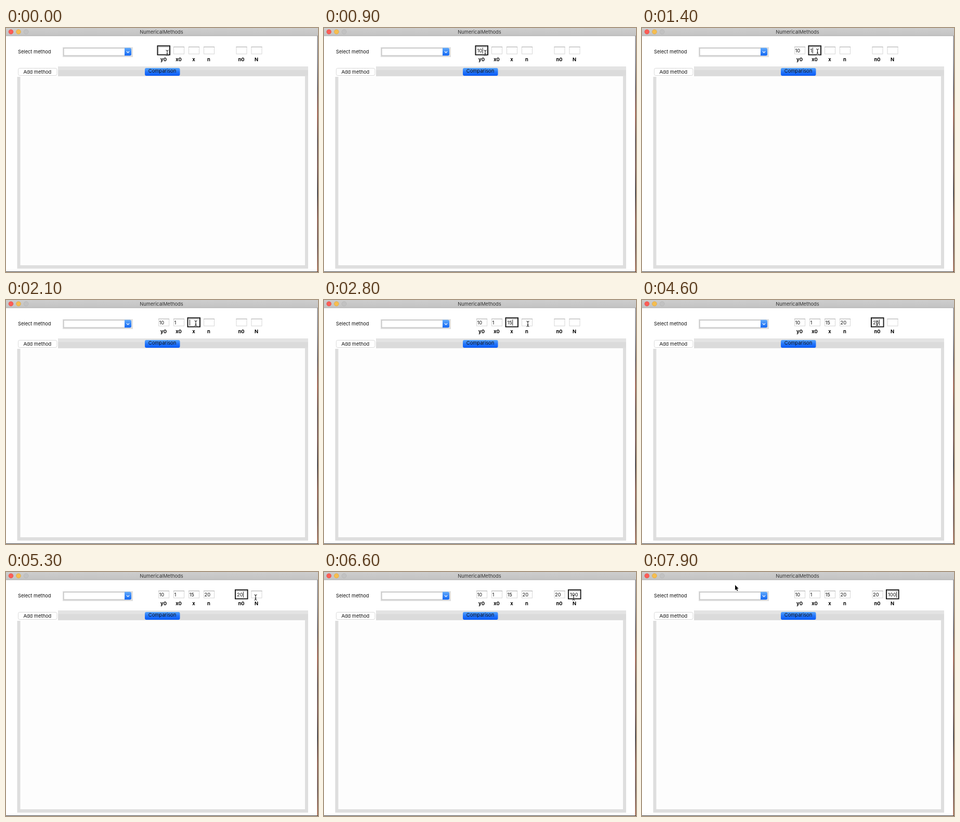
An HTML page with a canvas for the animation above (8 s loop, 600x470 px).

```html
<!DOCTYPE html>
<html lang="en">
<head>
<meta charset="utf-8">
<title>NumericalMethods</title>
<style>
html, body { margin: 0; width: 100%; height: 100%; overflow: hidden; background: #fff; }
canvas { display: block; }
</style>
</head>
<body>
<canvas id="stage" width="600" height="470"></canvas>
<script>
const ctx = document.getElementById('stage').getContext('2d');
const LOOP = 8000, STEP = 100;
const FONT = 'Inter, "Open Sans", sans-serif';

// Entry fields: left edge, label, focus time, [time, text] for each key press
const fields = [
  { x: 293, label: 'y0', focus: 0, keys: [[100, '1'], [500, '10']] },
  { x: 322, label: 'x0', focus: 1200, keys: [[1400, '1']] },
  { x: 351, label: 'x', focus: 2100, keys: [[2300, '1'], [2500, '15']] },
  { x: 380, label: 'n', focus: 3100, keys: [[3300, '2'], [3500, '20']] },
  { x: 442.5, label: 'n0', focus: 4100, keys: [[4400, '2'], [4600, '20']] },
  { x: 471.5, label: 'N', focus: 5600, keys: [[5900, '1'], [6300, '10'], [6400, '100']] }
];

// Pointer stops: time, x, y
const path = [
  [0, 310, 48], [900, 310, 48], [1200, 337.5, 45.5], [1800, 337.5, 45.5],
  [2100, 365, 45], [2600, 365, 45], [2800, 392, 46], [3500, 392, 46],
  [3800, 405, 45], [4100, 452, 45], [4900, 452, 45], [5300, 480, 49],
  [6600, 480, 49], [7700, 183, 23], [7800, 182, 22], [7900, 179, 25]
];

function rect(x, y, w, h, color) {
  ctx.fillStyle = color;
  ctx.fillRect(x, y, w, h);
}

function text(s, x, y, align = 'left', weight = 400, color = '#111') {
  ctx.font = `${weight} 9.3px ${FONT}`;
  ctx.textAlign = align;
  ctx.fillStyle = color;
  ctx.fillText(s, x, y);
}

function vertical(y0, y1, ...colors) {
  const g = ctx.createLinearGradient(0, y0, 0, y1);
  colors.forEach((c, i) => g.addColorStop(i / (colors.length - 1), c));
  return g;
}

function rounded(x, y, w, h, r, fill, stroke) {
  ctx.beginPath();
  ctx.roundRect(x, y, w, h, r);
  ctx.fillStyle = fill;
  ctx.fill();
  if (stroke) {
    ctx.strokeStyle = stroke;
    ctx.lineWidth = 1;
    ctx.stroke();
  }
}

function dot(x, fill, edge) {
  ctx.beginPath();
  ctx.arc(x, 7.3, 4.4, 0, Math.PI * 2);
  ctx.fillStyle = fill;
  ctx.fill();
  ctx.strokeStyle = edge;
  ctx.lineWidth = 0.6;
  ctx.stroke();
}

function titleBar() {
  rect(0, 0, 600, 15, vertical(0, 15, '#cdcdcd', '#c3c3c3'));
  rect(0, 14.5, 600, 1, '#a9a9a9');
  dot(9.5, '#fc5d56', '#e0443e');
  dot(24, '#f6be4f', '#dea034');
  dot(38.7, '#c2c2c2', '#b0b0b0');
  text('NumericalMethods', 299, 11, 'center', 400, '#333');
}

function combo() {
  text('Select method', 23, 49);
  rect(109, 37, 135, 19, '#dfdfdf');
  rect(110.5, 38.5, 118, 15, '#b9b9b9');
  rect(111.5, 39.5, 117, 13, '#fff');
  rounded(228, 38.3, 13, 15, [0, 3, 3, 0], vertical(38, 53, '#62abfb', '#1468f4'));
  ctx.beginPath();
  ctx.moveTo(232, 45);
  ctx.lineTo(234.5, 47.6);
  ctx.lineTo(237, 45);
  ctx.strokeStyle = '#fff';
  ctx.lineWidth = 1.2;
  ctx.stroke();
}

function panel() {
  rect(100, 74, 481, 8, '#e3e3e3');
  rect(100, 81, 481, 12, '#dbdbdb');
  rect(21.5, 94, 559.5, 369.5, '#dedede');
  rect(100, 92, 481, 3, '#dedede');
  rect(27.5, 93, 547.5, 364, '#fdfdfd');
  rounded(23.5, 77.5, 74.5, 14, 3, '#fff', '#d9d9d9');
  text('Add method', 60.3, 87.5, 'center');
  rounded(267, 77, 67.5, 15, 3, vertical(77, 92, '#5aa6fb', '#2274fb', '#0a5cf6'));
  text('Comparison', 300.5, 85.5, 'center');
}

function desktopEdge() {
  rect(598.5, 15, 1.5, 455, vertical(15, 470,
    '#8a8a90', '#70707a', '#45404a', '#8d3d28', '#3b2d30', '#5a2f2a', '#17151b', '#713526', '#4a3432', '#9a5234'));
  rect(0, 469, 600, 1, '#3a3a3c');
}

function typed(f, t) {
  return f.keys.reduce((s, [at, value]) => t >= at ? value : s, '');
}

function caretOn(t) {
  return t >= 100 && !(t >= 6600 && t < 6900);
}

function entry(f, t, focused) {
  if (focused) {
    rect(f.x - 2.5, 33.5, 25.5, 19, '#0a0a0a');
    rect(f.x - 0.7, 35.3, 21.9, 15.4, '#fff');
  }
  rect(f.x, 36, 21, 14.5, '#d6d6d6');
  rect(f.x, 36, 21, 1, '#a6a6a6');
  rect(f.x + 1, 37, 19, 12.5, '#fff');
  const s = typed(f, t);
  text(s, f.x + 1.5, 47);
  if (focused && caretOn(t)) {
    rect(f.x + 2 + ctx.measureText(s).width, 38, 0.9, 11, '#111');
  }
  text(f.label, f.x + 10, 63.5, 'center', 700, '#000');
}

function pointerAt(t) {
  let i = path.findIndex(p => p[0] > t);
  if (i < 0) return path[path.length - 1].slice(1);
  const [t0, x0, y0] = path[i - 1], [t1, x1, y1] = path[i];
  const u = (t - t0) / (t1 - t0), e = u * u * (3 - 2 * u);
  return [x0 + (x1 - x0) * e, y0 + (y1 - y0) * e];
}

function beam(x, y) {
  ctx.beginPath();
  for (const s of [-1, 1]) {
    ctx.moveTo(x - 2.6, y + s * 5.2);
    ctx.quadraticCurveTo(x, y + s * 5.2, x, y + s * 3.4);
    ctx.quadraticCurveTo(x, y + s * 5.2, x + 2.6, y + s * 5.2);
  }
  ctx.moveTo(x, y - 4);
  ctx.lineTo(x, y + 4);
  ctx.moveTo(x - 1.4, y + 1.7);
  ctx.lineTo(x + 1.4, y + 1.7);
  ctx.strokeStyle = 'rgba(255,255,255,.8)';
  ctx.lineWidth = 2.2;
  ctx.stroke();
  ctx.strokeStyle = '#111';
  ctx.lineWidth = 1;
  ctx.stroke();
}

function arrow(x, y) {
  const shape = [[0, 0], [0, 10], [2.2, 8], [3.8, 11.6], [5.4, 10.9], [3.8, 7.3], [6.8, 7]];
  ctx.beginPath();
  shape.forEach(([dx, dy]) => ctx.lineTo(x + dx, y + dy));
  ctx.closePath();
  ctx.lineJoin = 'round';
  ctx.strokeStyle = '#fff';
  ctx.lineWidth = 1.4;
  ctx.stroke();
  ctx.fillStyle = '#0a0a0a';
  ctx.fill();
}

function draw(t) {
  rect(0, 0, 600, 470, '#fff');
  titleBar();
  combo();
  panel();
  desktopEdge();
  const active = fields.filter(f => t >= f.focus).pop();
  fields.forEach(f => entry(f, t, f === active));
  const [x, y] = pointerAt(t);
  const inside = fields.some(f => x >= f.x && x <= f.x + 21 && y >= 36 && y <= 51);
  (inside ? beam : arrow)(x, y);
}

const start = performance.now();
function tick() {
  const t = (performance.now() - start) % LOOP;
  draw(Math.floor(t / STEP) * STEP);
  requestAnimationFrame(tick);
}
tick();
</script>
</body>
</html>
```
